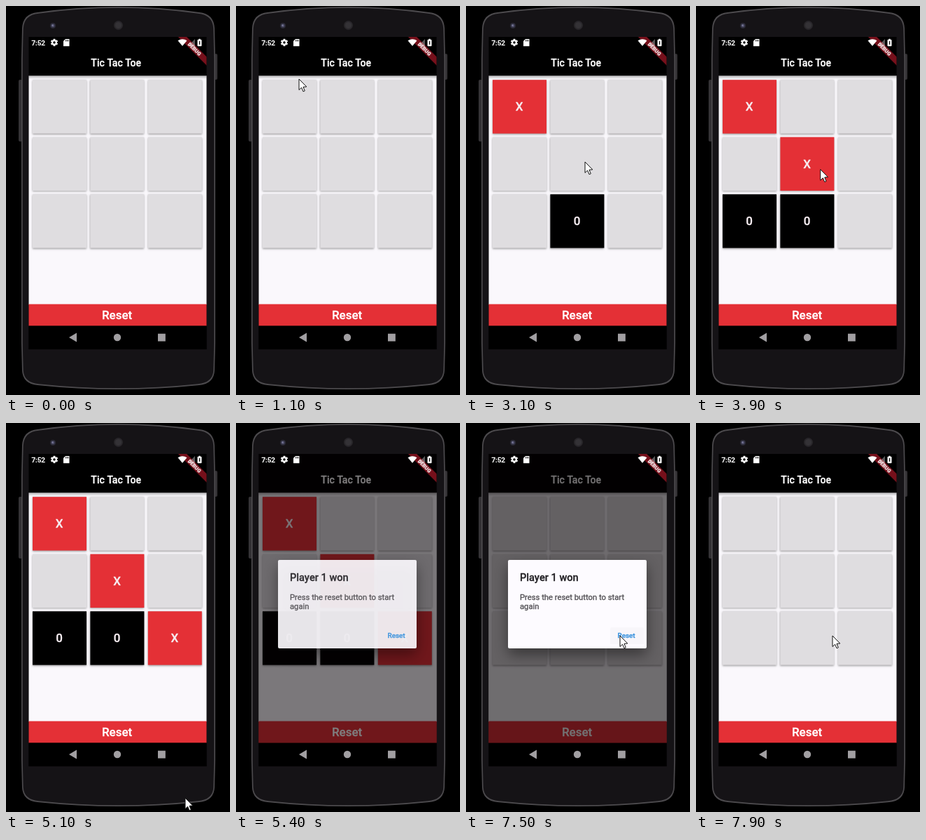
Animation of 320x554 px, one loop 8 s. Source, as an HTML page with a canvas:

```html
<!DOCTYPE html>
<html lang="en">
<head>
<meta charset="utf-8">
<title>Tic Tac Toe</title>
<style>
html, body { margin: 0; width: 100%; height: 100%; overflow: hidden; background: #000; }
canvas { display: block; width: 320px; height: 554px; }
</style>
</head>
<body>
<canvas id="stage"></canvas>
<script>
const W = 320, H = 554, LOOP = 8000;
const RED = '#e43036', FONT = 'Roboto, "Noto Sans", sans-serif';
const SCREEN = { x: 32.5, y: 44, w: 254, h: 411.5 };
const FIRST_TAP = 1700, TAP_GAP = 1600, DIALOG_IN = 5295, CLEAR = 7450, DIALOG_OUT = 7530;

// Pointer strokes: leave time, arrival time, destination
const STROKES = [
  [500, 700, 143, 52],
  [850, 1100, 90, 104],
  [2300, 3100, 170, 222],
  [3700, 4500, 219, 290],
  [4950, 5100, 256, 534],
  [5150, 5300, 262, 575],
  [5700, 6500, 154, 236],
  [6700, 7300, 220, 303],
  [7550, 7850, 195, 303]
];

const canvas = document.getElementById('stage');
const ratio = window.devicePixelRatio || 1;
canvas.width = W * ratio;
canvas.height = H * ratio;
const ctx = canvas.getContext('2d');
ctx.scale(ratio, ratio);

const clamp = v => Math.max(0, Math.min(1, v));
const easeOut = p => 1 - (1 - p) * (1 - p);
const smooth = p => p * p * (3 - 2 * p);

function rect(x, y, w, h, color) {
  ctx.fillStyle = color;
  ctx.fillRect(x, y, w, h);
}

function round(x, y, w, h, r, color) {
  ctx.fillStyle = color;
  ctx.beginPath();
  ctx.roundRect(x, y, w, h, r);
  ctx.fill();
}

function circle(x, y, r, color) {
  ctx.fillStyle = color;
  ctx.beginPath();
  ctx.arc(x, y, r, 0, Math.PI * 2);
  ctx.fill();
}

function poly(points, color) {
  ctx.fillStyle = color;
  ctx.beginPath();
  points.forEach(([x, y]) => ctx.lineTo(x, y));
  ctx.closePath();
  ctx.fill();
}

// A hairline stroke gives the text its slightly heavy look
function text(str, x, y, size, color, align = 'left', weight = 500) {
  ctx.font = `${weight} ${size}px ${FONT}`;
  ctx.textAlign = align;
  ctx.fillStyle = ctx.strokeStyle = color;
  ctx.lineWidth = .3;
  ctx.lineJoin = 'round';
  ctx.fillText(str, x, y);
  ctx.strokeText(str, x, y);
}

function shadow(color, blur, dy) {
  ctx.shadowColor = color;
  ctx.shadowBlur = blur * ratio;
  ctx.shadowOffsetY = dy * ratio;
}

// Straight sides, tight corners, bulging top and bottom
function body(inset, color) {
  const l = 22 + inset, r = 299 - inset, t = 1 + inset, b = 546 - inset;
  ctx.fillStyle = color;
  ctx.beginPath();
  ctx.moveTo(l, 75);
  ctx.lineTo(l + 1, 32);
  ctx.quadraticCurveTo(l + 2, t + 10, l + 23, t + 8);
  ctx.quadraticCurveTo(160, t - 8, r - 23, t + 8);
  ctx.quadraticCurveTo(r - 2, t + 10, r - 1, 32);
  ctx.lineTo(r, 75);
  ctx.lineTo(r, 480);
  ctx.lineTo(r - 1, 519);
  ctx.quadraticCurveTo(r - 2, b - 8, r - 23, b - 6);
  ctx.quadraticCurveTo(160, b + 6, l + 23, b - 6);
  ctx.quadraticCurveTo(l + 2, b - 8, l + 1, 519);
  ctx.lineTo(l, 480);
  ctx.fill();
}

function drawPhone() {
  rect(0, 0, W, H, '#000');
  round(18, 105, 5, 88, 2, '#343235');
  round(298, 68, 4, 37, 2, '#343235');
  body(0, '#4c4a4d');
  body(1.7, '#151316');
  circle(160.5, 27.5, 6.5, '#29272b');
  circle(160.5, 27.5, 4.5, '#343236');
  circle(67, 28, 4, '#2c2b38');
  circle(67, 28, 2.3, '#50506c');
  circle(66.5, 27.5, 1, '#8888a8');
}

// The player walks the diagonal; each reply steps back along the bottom row
function marksAt(t) {
  const marks = {};
  if (t >= CLEAR) return marks;
  for (let turn = 0; turn < 3; turn++) {
    if (t < FIRST_TAP + turn * TAP_GAP) break;
    marks[turn * 4] = 'X';
    if (turn < 2) marks[7 - turn] = '0';
  }
  return marks;
}

function drawBoard(t) {
  const { x: left, w } = SCREEN;
  rect(left, 44, w, 445, '#000');
  rect(left, 99.3, w, 326, '#faf8fc');
  const fall = ctx.createLinearGradient(0, 99, 0, 104);
  fall.addColorStop(0, 'rgba(0,0,0,.3)');
  fall.addColorStop(1, 'rgba(0,0,0,0)');
  rect(left, 99.3, w, 5, fall);
  text('Tic Tac Toe', 157.2, 85.5, 14.1, '#fff', 'center');

  const marks = marksAt(t);
  for (let i = 0; i < 9; i++) {
    const x = 38 + (i % 3) * 82.4, y = 105.2 + Math.floor(i / 3) * 81.5;
    const mark = marks[i];
    ctx.save();
    shadow('rgba(0,0,0,.36)', 2.6, .9);
    rect(x, y, 77, 76.4, mark ? (mark === 'X' ? RED : '#000') : '#dfdde0');
    ctx.restore();
    if (mark) text(mark, x + 38.2, y + 43.8, 17, '#f7eef2', 'center');
  }

  rect(left, 424.6, w, 31, RED);
  rect(left, 455.6, w, 33.4, '#000');
  text('Reset', 158.6, 446, 17, '#fff', 'center');
}

function drawBanner() {
  ctx.save();
  ctx.beginPath();
  ctx.rect(SCREEN.x, SCREEN.y, SCREEN.w, SCREEN.h);
  ctx.clip();
  ctx.translate(286.5, 44);
  ctx.rotate(Math.PI / 4);
  rect(-32, 20, 64, 8.7, '#76101b');
  text('DEBUG', 0, 26.9, 7.2, '#f4e4e6', 'center', 900);
  ctx.restore();
}

function drawSystem() {
  text('7:52', 36.5, 56, 9.9, '#fff');

  ctx.save();
  ctx.translate(69, 52);
  for (let i = 0; i < 6; i++) {
    rect(-1.4, -5.2, 2.8, 3, '#fff');
    ctx.rotate(Math.PI / 3);
  }
  circle(0, 0, 3.9, '#fff');
  circle(0, 0, 1.7, '#000');
  ctx.restore();

  poly([[85, 47], [90.5, 47], [90.5, 57.2], [82, 57.2], [82, 50]], '#fff');
  for (let i = 0; i < 3; i++) rect(85.1 + i * 1.7, 48.2, .9, 2.2, '#000');

  ctx.fillStyle = '#fff';
  ctx.beginPath();
  ctx.moveTo(252, 57);
  ctx.lineTo(245.5, 49.3);
  ctx.quadraticCurveTo(252, 45, 258.5, 49.3);
  ctx.fill();
  poly([[270, 47], [270, 57], [260, 57]], 'rgba(255,255,255,.35)');
  round(273.5, 48, 6, 9.3, .8, '#fff');
  rect(275.2, 46.8, 2.6, 1.5, '#fff');
  rect(276, 50, 1.2, 5, '#000');

  poly([[90, 472], [101, 465.5], [101, 478.5]], '#a19fa2');
  circle(159, 472, 5.2, '#a19fa2');
  rect(217, 466.7, 10.8, 10.8, '#a19fa2');
}

function drawDialog(t) {
  const show = easeOut(clamp((t - DIALOG_IN) / 150)) - clamp((t - DIALOG_OUT) / 160);
  if (show <= 0) return;
  rect(SCREEN.x, SCREEN.y, SCREEN.w, SCREEN.h, `rgba(4,0,2,${.56 * show})`);

  ctx.save();
  ctx.globalAlpha = show;
  shadow('rgba(0,0,0,.45)', 20, 9);
  round(60, 195, 198, 126, 2, '#fdfbff');
  shadow('transparent', 0, 0);
  if (t > CLEAR) round(206, 291, 48, 24, 1.5, 'rgba(0,0,0,.02)');
  text('Player 1 won', 77, 225, 14.6, '#242226');
  text('Press the reset button to start', 77, 252, 11.25, '#4e4c50', 'left', 400);
  text('again', 77, 265.2, 11.25, '#4e4c50', 'left', 400);
  text('Reset', 216.5, 306.3, 9.9, '#338fdd');
  ctx.restore();
}

function drawPointer(t) {
  let x = 185, y = -30;
  for (const [leave, arrive, toX, toY] of STROKES) {
    const p = smooth(clamp((t - leave) / (arrive - leave)));
    x += (toX - x) * p;
    y += (toY - y) * p;
  }
  ctx.save();
  ctx.translate(x, y);
  poly([[0, 0], [0, 15.5], [3.6, 12.2], [6, 17.8], [8.3, 16.8], [6, 11.3], [10.8, 11]], '#fff');
  ctx.strokeStyle = '#111';
  ctx.lineWidth = 1;
  ctx.lineJoin = 'round';
  ctx.stroke();
  ctx.restore();
}

function frame(t) {
  drawPhone();
  drawBoard(t);
  drawDialog(t);
  drawBanner();
  drawSystem();
  drawPointer(t);
}

const start = performance.now();
function tick() {
  frame((performance.now() - start) % LOOP);
  requestAnimationFrame(tick);
}
tick();
</script>
</body>
</html>
```
